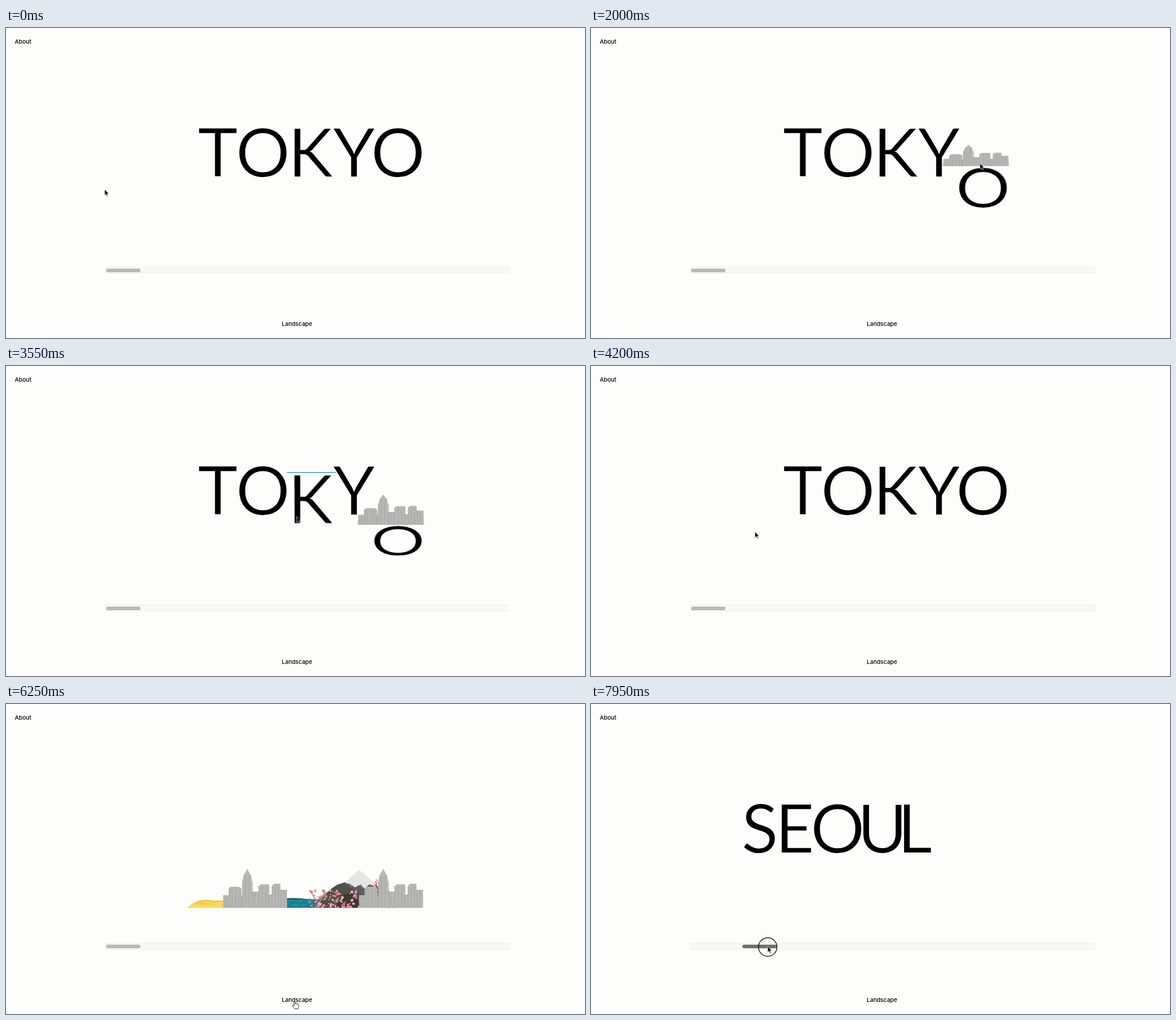
An HTML page for the animation above (8 s loop, 960 px wide and 514 px high).

```html
<!DOCTYPE html>
<html lang="en">
<head>
<meta charset="utf-8">
<title>Cities</title>
<style>
  :root { --paper: #fdfdfc; }
  html, body { margin: 0; width: 100%; height: 100%; overflow: hidden; background: var(--paper); }
  #stage { position: relative; width: 960px; height: 514px; overflow: hidden; }
  #view { position: absolute; left: 164px; top: 0; width: 672px; height: 390px; overflow: hidden; }
  #strip { position: absolute; left: -164px; top: 0; }
  .face { position: absolute; top: 163px; width: 150px; height: 175px; overflow: visible; backface-visibility: hidden; }
  /* The paper-coloured outline thins the strokes of the letters */
  .face text { font: 400 113px Lato, sans-serif; text-anchor: middle; stroke: var(--paper); stroke-width: 1.5px; }
  .label { position: absolute; font: 500 9.6px/12px Inter, sans-serif; color: #000; }
  #track { position: absolute; left: 164px; top: 396px; width: 672px; height: 11px; box-sizing: border-box;
    background: #f8f8f8; border: solid #ececea; border-width: 1px 0; }
  #thumb { position: absolute; left: 166px; top: 399px; width: 57px; height: 6px; border-radius: 3px; }
  #pointer { position: absolute; left: 0; top: 0; width: 1px; height: 1px; overflow: visible; }
</style>
</head>
<body>
<div id="stage">
  <div id="view"><div id="strip"></div></div>
  <div class="label" style="left:14.5px;top:17px">About</div>
  <div class="label" style="left:422px;width:121px;top:484.5px;text-align:center">Landscape</div>
  <div id="track"></div>
  <div id="thumb"></div>
  <svg id="pointer">
    <circle id="ring" cy="1" r="15.3" fill="none" stroke="#000" stroke-width="1.2"/>
    <path id="arrow" d="M0 0V9.6L2.2 7.6 3.8 11.2 5.4 10.5 3.9 7H6.9Z" stroke="#fff" stroke-width=".6"/>
    <path id="hand" d="M1.4 6V1.2Q2.4-.2 3.4 1.2V4.6Q5-.1 5.8 5 6.8 3.2 7.6 5.2 9 4.4 9.2 6.4V9.5L8 12.5H3L-.8 8.2Q-1.2 6.6.2 6.8L1.4 8Z"
      fill="#fff" stroke="#222" stroke-width=".9" stroke-linejoin="round"/>
  </svg>
</div>
<script>
const LOOP = 8000, STEP = 10, TURN_MS = 350, RADIUS = 87.5;
const PRESS = 7220, SCROLL_RATIO = 996 / 85;
const $ = id => document.getElementById(id);

// Pointer route: time, x, y
const route = [
  [0, 163, 268], [330, 375, 226], [720, 375, 226], [800, 407, 220], [1300, 407, 220],
  [1950, 645, 224], [2150, 645, 226], [2480, 565, 227], [2700, 565, 227], [3150, 686, 232],
  [3300, 686, 234], [3750, 320, 262], [3900, 266, 272], [4200, 270, 275], [4383, 600, 254],
  [4645, 740, 245], [4790, 822, 240], [4850, 822, 241], [5200, 600, 430], [5450, 480, 505],
  [5700, 476, 493], [6450, 476, 493], [6950, 205, 404], [7100, 209, 402], [7240, 209, 402],
  [7950, 293, 402], [8000, 293, 402]
];

function pointerAt(t) {
  const i = Math.max(1, route.findIndex(p => p[0] >= t));
  const [t0, x0, y0] = route[i - 1], [t1, x1, y1] = route[i];
  const k = (t - t0) / (t1 - t0);
  return [x0 + (x1 - x0) * k, y0 + (y1 - y0) * k];
}

function seeded(seed) {
  return () => (seed = seed * 16807 % 2147483647) / 2147483647;
}

const shape = (d, fill) => `<path d="${d}" fill="${fill}"/>`;
const line = (d, stroke, width, extra = '') =>
  `<path d="${d}" fill="none" stroke="${stroke}" stroke-width="${width}" ${extra}/>`;

const sand = () =>
  shape('M300 338Q315 324 329 324.5T360 326Q382 324 407 338Z', '#fcd85c') +
  shape('M312 330Q325 326 336 331T362 331V334Q345 332 331 333T312 330Z', '#f4c850') +
  line('M318 328Q328 325 341 327M338 329L360 327', '#d9a63c', .8);

const sea = () =>
  shape('M466 322Q480 321 495 323T556 323V338H466Z', '#168a9b') +
  shape('M466 322Q480 321 495 323T556 323V325H466Z', '#355f62') +
  line('M466 328H540M470 331.5H550M466 335H535', '#0c6c86', 1.1, 'stroke-dasharray="13 3 7 2"') +
  line('M468 326.5H540M474 333.5H550', '#42afb5', .7, 'stroke-dasharray="9 6"');

function city(dx) {
  const outline = 'M360 338V317H369V306L372 303H386L390 306V318H392V294L394 283 397 279 400 273 403 279' +
    ' 406 283 408 294V311H419V302L422 299H436V316H441V302L444 298H455V308H466V338Z';
  return `<g transform="translate(${dx})">` + shape(outline, '#b7b7b4') +
    line('M371 306V338M390 306V338M392 294V338M409 294V338M419 302V338M436 300V338M441 302V338M456 308V338', '#9b9b98', .7) +
    line('M363 320V338M367 320V338M375 307V338M381 307V338M386 307V338M397 286V338M403 286V338M413 314V338' +
      'M425 303V338M431 303V338M446 303V338M451 303V338M461 311V338', '#a5a5a2', 2, 'stroke-dasharray="1.4 1.2"') + '</g>';
}

function mountain() {
  const random = seeded(41);
  let art =
    shape('M511 338Q520 320 538 307L566 293 585 276 606 294Q629 311 637 338Z', '#85857f') +
    shape('M548 300L566 294 572 303 583 296 591 306 601 298Q628 312 634 338H560Z', '#5f5f66') +
    shape('M521 328Q540 298 560 297L578 309 594 321 604 338H516Z', '#505049') +
    shape('M545 338Q560 304 578 318L589 338Z', '#3a3a32') +
    shape('M561 296L585 275 608 294 612 302 602 299 594 306 588 299 578 304 571 299Z', '#e6e6e2') +
    line('M506 338Q518 326 503 309M511 337L528 313M540 338L550 315M565 338L579 317M607 338L619 316 612 294' +
      'M629 338Q641 325 642 312M621 328L634 309', '#75564a', 1.1);
  const blossom = (x, y) => {
    const color = ['#eb9aa6', '#e38795', '#f3b5bb', '#cf6f80'][Math.floor(random() * 4)];
    art += `<circle cx="${x.toFixed(1)}" cy="${y.toFixed(1)}" r="${(1 + random() * 1.3).toFixed(1)}" fill="${color}"/>`;
  };
  for (let i = 0; i < 165; i++) {
    const x = 503 + random() * 140;
    const reach = x < 585 ? 29 : 27 - 8 * Math.cos((x - 585) / 10);
    blossom(x, 337 - reach * random() ** 1.35);
  }
  for (let i = 0; i < 9; i++) blossom(610 + random() * 6, 291 + random() * 20);
  return art;
}

// Anchor x, art, hover range
const tokyo = [
  ['T', 351, sand(), 320, 382],
  ['O', 426, city(0), 388, 467],
  ['K', 505, sea(), 479, 539],
  ['Y', 576.5, mountain(), 545, 593],
  ['O', 649.5, city(225), 612, 740]
];
const seoul = [['S', 280], ['E', 338], ['O', 409], ['U', 482.5], ['L', 537]];

function addFace(x, content) {
  const box = document.createElement('div');
  box.innerHTML = `<svg class="face" style="left:${x - 75}px" viewBox="${x - 75} 163 150 175">${content}</svg>`;
  return $('strip').appendChild(box.firstChild);
}
const addLetter = (char, x) => addFace(x, `<text x="${x}" y="246.7">${char}</text>`);

const cubes = tokyo.map(([char, x, art]) => [addLetter(char, x), addFace(x, art)]);
seoul.forEach(([char, x]) => addLetter(char, x + 996));

const overLabel = (x, y) => x > 455 && x < 510 && y > 482 && y < 499;

// Progress of every cube at each time step, driven by what the pointer is over
const turns = [];
let state = tokyo.map(() => 0);
for (let t = 0; t <= LOOP; t += STEP) {
  const [x, y] = pointerAt(t);
  state = state.map((p, i) => {
    const [, , , left, right] = tokyo[i];
    const on = overLabel(x, y) || (y < 338 && x >= left && x <= right);
    return Math.min(1, Math.max(0, p + (on ? STEP : -STEP) / TURN_MS));
  });
  turns.push(state);
}

function rotate(face, degrees) {
  face.style.transform =
    `perspective(1000px) translateZ(${-RADIUS}px) rotateX(${degrees}deg) translateZ(${RADIUS}px)`;
}

function draw(t) {
  const [x, y] = pointerAt(t);
  const pressed = t >= PRESS;
  const shift = pressed ? (x - 209) * 85 / 84 : 0;

  turns[Math.floor(t / STEP)].forEach((p, i) => {
    const angle = 90 * p * p * (3 - 2 * p);
    const [letter, art] = cubes[i];
    rotate(letter, -angle);
    rotate(art, 90 - angle);
    letter.style.visibility = p === 1 ? 'hidden' : 'visible';
    art.style.visibility = p === 0 ? 'hidden' : 'visible';
  });

  $('strip').style.transform = `translateX(${-shift * SCROLL_RATIO}px)`;
  $('thumb').style.transform = `translateX(${shift}px)`;
  $('thumb').style.background = pressed ? '#70706c' : '#b9b9b5';
  $('pointer').style.transform = `translate(${x}px, ${y}px)`;
  const hand = overLabel(x, y);
  $('hand').style.display = hand ? '' : 'none';
  $('arrow').style.display = hand ? 'none' : '';
  $('ring').style.display = pressed ? '' : 'none';
}

const start = performance.now();
function frame() {
  draw((performance.now() - start) % LOOP);
  requestAnimationFrame(frame);
}
frame();
</script>
</body>
</html>
```
